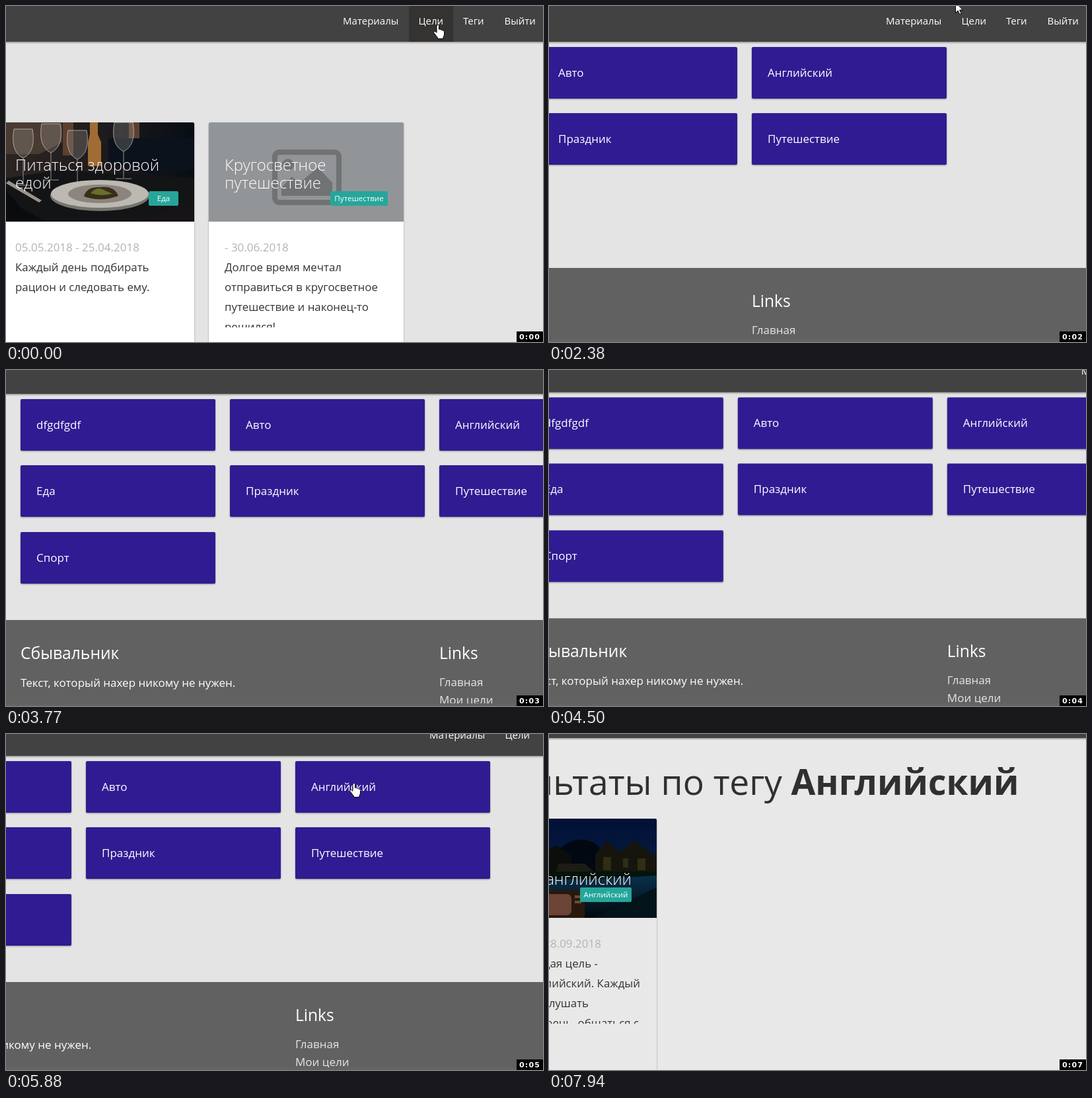
An HTML page that plays this animation: 813x508 px, repeating every 8 s.

```html
<!DOCTYPE html>
<html lang="ru">
<head>
<meta charset="utf-8">
<title>Цели и теги</title>
<style>
html, body { margin: 0; width: 100%; height: 100%; overflow: hidden; background: #e4e4e4; }
svg { display: block; }
#stage { position: absolute; left: 0; top: 0; }
text { font: 17px "Open Sans", sans-serif; white-space: pre; }

.bg, .camera, .cursor, .hand, .arrow, .clock, .goals, .tags, .results, .sheet {
  animation: 8s step-end infinite;
}
.bg { fill: #e4e4e4; animation-name: haze; }
.camera { animation-name: pan; }
.goals { animation-name: goals; }
.tags { animation-name: tags; }
.results { animation-name: results; }
.sheet { fill: #fff; animation-name: haze; }
.cursor { animation-name: move; }
.hand { animation-name: hand; }
.arrow { animation-name: arrow; }
.clock { animation-name: clock; }

.nav { fill: #424242; filter: drop-shadow(0 1px 1.5px rgba(0,0,0,.5)); }
.menu text { font-size: 15px; font-weight: 500; fill: #fff; }
.card { filter: drop-shadow(0 1px 1.2px rgba(0,0,0,.38)); }
.white { fill: #fff; }
.name { font-size: 24px; font-weight: 300; fill: #fff; }
.badge { fill: #26a69a; }
.small { font-size: 11.6px; fill: #fff; }
.date { fill: #b3b3b3; }
.body { fill: #333; }
.body, .body text { font-size: 16.875px; }
.end { text-anchor: end; }
.head { font-size: 24.6px; fill: #fff; }
.link { fill: #e6e6e6; }
.title { font-size: 53.4px; fill: #303030; }
.bold { font-weight: 700; }
.clock text { font: bold 11px "DejaVu Sans", sans-serif; letter-spacing: 1.2px; fill: #fff; }
.hand, .arrow { fill: #fff; stroke: #000; stroke-linejoin: round; }

@keyframes haze { 97.75% { fill: #e8e8e8; } 100% { fill: #e8e8e8; } }
@keyframes goals { 0% { visibility: visible; } 24%, 100% { visibility: hidden; } }
@keyframes tags {
  0% { visibility: hidden; }
  24% { visibility: visible; }
  83.375%, 100% { visibility: hidden; }
}
@keyframes results { 0% { visibility: hidden; } 83.375%, 100% { visibility: visible; } }

@keyframes pan {
  0% { transform: translate(-349px, 0); }
  38% { transform: translate(-349px, 0); animation-timing-function: steps(7, start); }
  48.56% { transform: translate(0, -18px); }
  53.25% { transform: translate(0, -18px); animation-timing-function: steps(7, start); }
  63.7% { transform: translate(-124px, -24px); }
  63.75% { transform: translate(-124px, -24px); animation-timing-function: steps(5, start); }
  71.19% { transform: translate(-218px, -21px); }
  97.75% { transform: translate(-186px, -34px); }
  99.2%, 100% { transform: translate(-154px, -48px); }
}

@keyframes move {
  0% { transform: translate(653px, 28px); }
  6.5% { transform: translate(659px, 39px); }
  8.375% { transform: translate(658px, 56px); }
  10.25% { transform: translate(663px, 51px); }
  12.125% { transform: translate(663px, 40px); }
  13.375% { transform: translate(664px, 34px); }
  15.25% { transform: translate(711px, 18px); }
  16.875% { transform: translate(704px, 11px); }
  18.75% { transform: translate(707px, 24px); }
  20.25% { transform: translate(706px, 31px); }
  22.125% { transform: translate(668px, 86px); }
  24% { transform: translate(668px, 86px); animation-timing-function: steps(5, start); }
  31.125% { transform: translate(615px, -6px); }
  31.625% { transform: translate(622px, 3px); }
  33.125% { transform: translate(605px, 8px); }
  34.75% { transform: translate(589px, 4px); }
  36.25% { transform: translate(595px, -60px); }
  69.75% { transform: translate(602px, -8px); }
  71.625% { transform: translate(565px, 72px); }
  73.45% { transform: translate(526px, 74px); }
  76.25% { transform: translate(524px, 72px); }
  78.25% { transform: translate(526px, 74px); }
  80% { transform: translate(533px, 100px); }
  81.5% { transform: translate(540px, 140px); }
  83.375%, 100% { transform: translate(540px, -60px); }
}
@keyframes hand {
  0% { visibility: visible; }
  8.375% { visibility: hidden; }
  12.125% { visibility: visible; }
  22.125% { visibility: hidden; }
  71.625% { visibility: visible; }
  81.5%, 100% { visibility: hidden; }
}
@keyframes arrow {
  0% { visibility: hidden; }
  8.375% { visibility: visible; }
  12.125% { visibility: hidden; }
  22.125% { visibility: visible; }
  71.625% { visibility: hidden; }
  81.5%, 100% { visibility: visible; }
}
@keyframes clock {
  0% { transform: translateY(0); }
  13.375% { transform: translateY(-16px); }
  25.375% { transform: translateY(-32px); }
  38% { transform: translateY(-48px); }
  50.125% { transform: translateY(-64px); }
  62.2% { transform: translateY(-80px); }
  74.75% { transform: translateY(-96px); }
  88.25%, 100% { transform: translateY(-112px); }
}
</style>
</head>
<body>
<svg id="stage" width="813" height="508">
  <defs>
    <rect id="tag" width="295" height="78" rx="2" fill="#311b92"/>
    <rect id="panel" width="295" height="420" rx="2"/>
    <clipPath id="photo"><path d="M0 150V2Q0 0 2 0H293Q295 0 295 2V150Z"/></clipPath>
    <clipPath id="lines"><rect y="330" width="1300" height="156"/></clipPath>
    <linearGradient id="dusk" x2="0" y2="1">
      <stop offset="0" stop-color="#021036"/><stop offset=".5" stop-color="#061c40"/>
    </linearGradient>
    <linearGradient id="road" x2="0" y2="1">
      <stop offset="0" stop-color="#0a3450"/><stop offset="1" stop-color="#02090f"/>
    </linearGradient>
    <linearGradient id="room">
      <stop offset="0" stop-color="#2c2522"/><stop offset=".5" stop-color="#201c1d"/>
      <stop offset="1" stop-color="#080d15"/>
    </linearGradient>
    <g id="glass" fill="#9a958f" fill-opacity=".3" stroke="#dcd6cf" stroke-opacity=".65">
      <path d="M-14 0Q-20 34 0 44Q20 34 14 0Z"/><path d="M0 44V84M-12 85H12" fill="none"/>
    </g>
  </defs>

  <rect class="bg" width="813" height="508"/>

  <g class="camera">
    <g class="goals">
      <g class="card white"><use href="#panel" x="339" y="176"/><use href="#panel" x="656" y="176"/></g>

      <g transform="translate(339 176)" clip-path="url(#photo)">
        <rect width="295" height="150" fill="url(#room)"/>
        <path d="M0 0H95V30L60 48H0Z" fill="#493a32"/>
        <path d="M96 0H112V50H96ZM196 0H212V34H196Z" fill="#5c4030"/>
        <path d="M137 0H149V18L154 30V66H134V30L137 18Z" fill="#a06c34"/>
        <path d="M165 24H295V70L230 78L165 60Z" fill="#0b121b"/>
        <path d="M0 86L90 72L295 84V150H0Z" fill="#131416"/>
        <use href="#glass" x="36" y="10"/>
        <use href="#glass" x="78" y="2"/>
        <use href="#glass" x="118" y="12"/>
        <use href="#glass" x="188" y="0"/>
        <ellipse cx="152" cy="111" rx="75" ry="23" fill="#77746f"/>
        <ellipse cx="152" cy="108" rx="74" ry="21" fill="#bcb8b2"/>
        <ellipse cx="152" cy="108" rx="48" ry="14" fill="#8b857e"/>
        <path d="M128 112Q132 97 151 98Q174 95 180 111Q154 121 128 112Z" fill="#3b2d1a"/>
        <path d="M138 107Q147 96 158 102T172 107Q156 113 138 107Z" fill="#66702c"/>
        <path d="M0 92L34 130L70 150H0Z" fill="#0a0b0e"/>
        <path d="M14 88L64 118L60 121L10 92Z" fill="#9c948c"/>
        <path d="M205 150Q250 126 295 132V150Z" fill="#171319"/>
      </g>
      <text class="name" x="363" y="249">Питаться здоровой</text>
      <text class="name" x="363" y="276">едой</text>
      <rect class="badge" x="565" y="280" width="45" height="22" rx="2"/>
      <text class="small" x="587.5" y="295" text-anchor="middle">Еда</text>
      <text class="date" x="363" y="371">05.05.2018 - 25.04.2018</text>
      <text class="body" x="363" y="401">Каждый день подбирать</text>
      <text class="body" x="363" y="431">рацион и следовать ему.</text>

      <g transform="translate(656 176)" clip-path="url(#photo)">
        <rect width="295" height="150" fill="#929598"/>
        <rect x="100" y="45" width="97" height="76" rx="7" fill="none" stroke="#707274" stroke-width="8"/>
        <circle cx="120" cy="64" r="9" fill="#707274"/>
        <path d="M110 111V98L126 82L137 92L165 68L187 91V111Z" fill="#707274"/>
      </g>
      <text class="name" x="680" y="249">Кругосветное</text>
      <text class="name" x="680" y="276">путешествие</text>
      <rect class="badge" x="840" y="280" width="87" height="22" rx="2"/>
      <text class="small" x="883.5" y="295" text-anchor="middle">Путешествие</text>
      <text class="date" x="680" y="371">- 30.06.2018</text>
      <g class="body" clip-path="url(#lines)">
        <text x="680" y="401">Долгое время мечтал</text>
        <text x="680" y="431">отправиться в кругосветное</text>
        <text x="680" y="461">путешествие и наконец-то</text>
        <text x="680" y="491">решился!</text>
      </g>
    </g>

    <g class="tags">
      <g class="card">
        <use href="#tag" x="22" y="62"/><use href="#tag" x="339" y="62"/><use href="#tag" x="656" y="62"/>
        <use href="#tag" x="22" y="162"/><use href="#tag" x="339" y="162"/><use href="#tag" x="656" y="162"/>
        <use href="#tag" x="22" y="263"/>
      </g>
      <g class="white">
        <text x="46" y="107">dfgdfgdf</text>
        <text x="363" y="107">Авто</text>
        <text x="680" y="107">Английский</text>
        <text x="46" y="207">Еда</text>
        <text x="363" y="207">Праздник</text>
        <text x="680" y="207">Путешествие</text>
        <text x="46" y="308">Спорт</text>
      </g>
      <rect x="-10" y="396" width="1320" height="200" fill="#616161"/>
      <text class="head" x="22" y="455">Сбывальник</text>
      <text class="white" x="22" y="497">Текст, который нахер никому не нужен.</text>
      <text class="head" x="656" y="455">Links</text>
      <text class="link" x="656" y="496">Главная</text>
      <text class="link" x="656" y="523">Мои цели</text>
    </g>

    <g class="results">
      <text class="title end" x="507" y="140">Результаты по тегу</text>
      <text class="title bold" x="520.5" y="140">Английский</text>
      <g class="card"><use class="sheet" href="#panel" x="22" y="176"/></g>
      <g transform="translate(22 176)" clip-path="url(#photo)">
        <rect width="295" height="150" fill="url(#dusk)"/>
        <path d="M0 30Q40 0 80 34T150 44T208 42V85H0Z" fill="#020812"/>
        <path d="M20 80V52L52 28L84 52V80ZM118 80V56L142 40L166 56V80Z" fill="#0c0e0c"/>
        <path d="M202 82V54L220 33L238 50L262 34L295 58V82Z" fill="#15150d"/>
        <path d="M214 58H226V78H214ZM244 60H252V74H244ZM266 60H278V78H266Z" fill="#302d14"/>
        <path d="M146 68H186L202 82H142Z" fill="#1c1b16"/>
        <rect y="80" width="295" height="70" fill="url(#road)"/>
        <path d="M0 80H295V86L190 92L0 88Z" fill="#04130c"/>
        <path d="M200 150L295 104V150Z" fill="#03131a"/>
        <rect x="112" y="108" width="74" height="42" rx="3" fill="#28190f"/>
        <rect x="120" y="114" width="46" height="32" rx="7" fill="#6b4436"/>
        <path d="M171 116H181V120H171ZM171 124H181V128H171Z" fill="#6a5030"/>
      </g>
      <text class="name end" x="279" y="276">Выучить английский</text>
      <rect class="badge" x="201" y="280" width="78" height="22" rx="2"/>
      <text class="small" x="240" y="295" text-anchor="middle">Английский</text>
      <text class="date end" x="233" y="371">01.05.2018 - 28.09.2018</text>
      <g class="body end" clip-path="url(#lines)">
        <text x="228" y="401">Моя следующая цель -</text>
        <text x="292" y="431">выучить английский. Каждый</text>
        <text x="214" y="461">день нужно слушать</text>
        <text x="290" y="491">английскую речь, общаться с</text>
      </g>
    </g>

    <rect class="nav" x="-10" y="-10" width="1320" height="64"/>
    <rect class="goals" x="959" y="-10" width="67" height="64" fill="#343332"/>
    <g class="menu">
      <text x="859" y="28">Материалы</text>
      <text x="973.5" y="28">Цели</text>
      <text x="1041" y="28">Теги</text>
      <text x="1103.5" y="28">Выйти</text>
    </g>
  </g>

  <rect class="tags" y="504" width="813" height="4" fill="#676263"/>

  <g class="cursor">
    <path class="arrow" d="M.5.5V16.5L4.2 13L6.8 18.5L9.2 17.5L6.7 12H11.5Z"/>
    <path class="hand" transform="translate(-6 0)" d="M5 2.2C5 0 8.5 0 8.5 2.2V7.5C9.5 6.6 11 7 11.3 8.2C12.3 7.5 13.8 8 14 9.2C15.2 8.7 16.5 9.5 16.5 11.2V15C16.5 17.5 14.7 18.5 14.7 21.5H6.8C6.8 19.5 4.5 17.5 3.5 16C2.5 14 .6 13 .6 11.5C.8 10 3 10 5 12.3Z"/>
  </g>

  <svg x="773" y="492" width="40" height="16">
    <rect width="40" height="16"/>
    <g class="clock">
      <text x="4" y="12">0:00</text>
      <text x="4" y="28">0:01</text>
      <text x="4" y="44">0:02</text>
      <text x="4" y="60">0:03</text>
      <text x="4" y="76">0:04</text>
      <text x="4" y="92">0:05</text>
      <text x="4" y="108">0:06</text>
      <text x="4" y="124">0:07</text>
    </g>
  </svg>
</svg>
</body>
</html>
```
